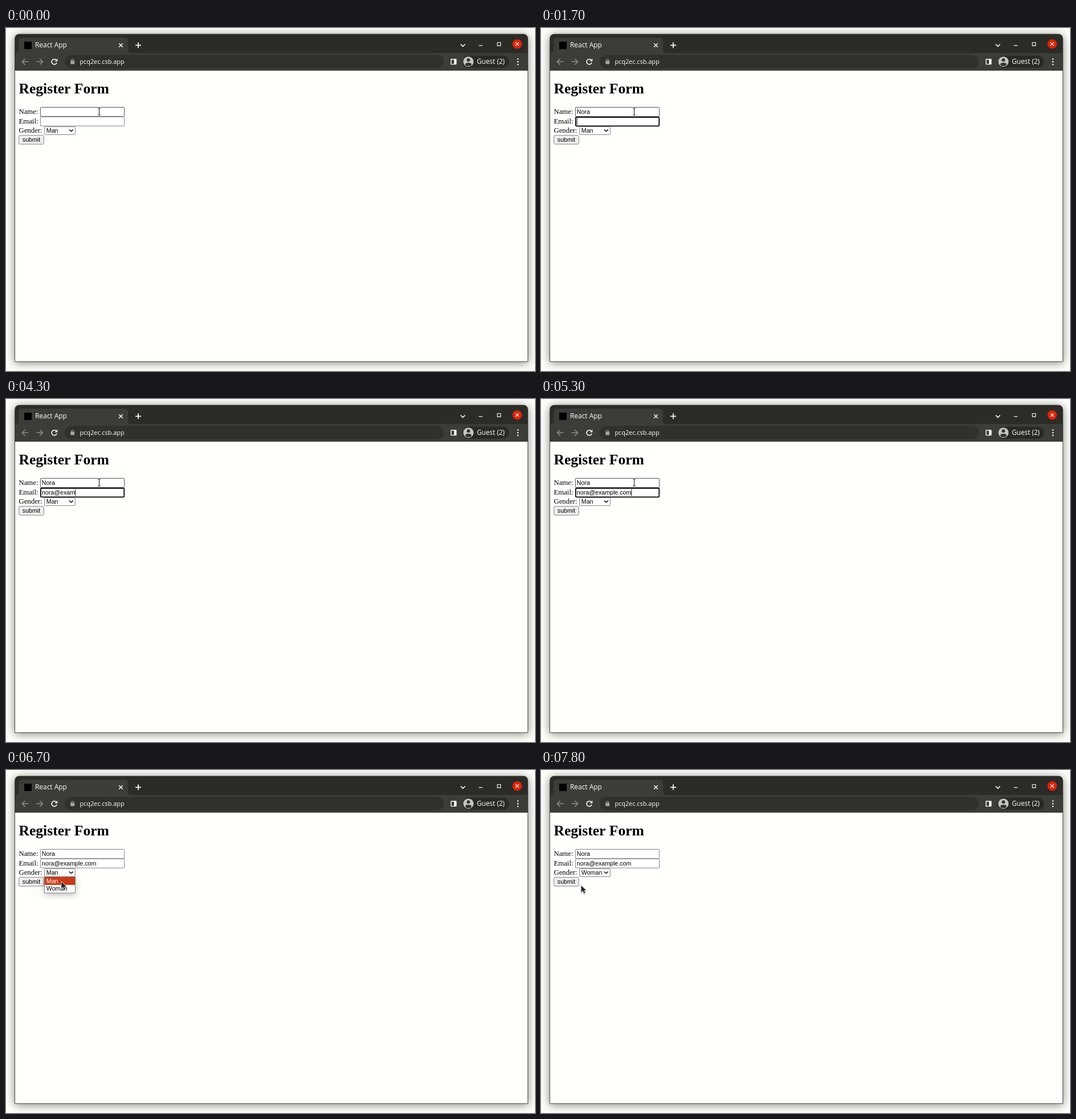
Write an HTML page with a canvas that moves like this. It is 928 px wide and 603 px high and loops after 8 s.

```html
<!DOCTYPE html>
<html lang="en">
<head>
<meta charset="utf-8">
<title>Register Form</title>
<style>
html, body { margin: 0; width: 100%; height: 100%; overflow: hidden; background: #fefefb; }
canvas { display: block; width: 928px; height: 603px; }
</style>
</head>
<body>
<canvas id="stage" width="928" height="603"></canvas>
<script>
const ctx = document.getElementById('stage').getContext('2d');
const LOOP = 8000, STEP = 100, ZOOM = 0.8;
const PAGE = '#fffffc', BAR = '#2b2c27', TOOL = '#3c3d38', GREY = '#767676';
const SERIF = '"Liberation Serif", "Times New Roman", serif';
const FIELD = '13.333px "Liberation Sans", Arial, sans-serif';
const UI = '"Open Sans", "Noto Sans", sans-serif';

// Each burst of typing starts at a time and runs at the field's pace.
const NAME = { y: 139.4, focus: 500, blur: 1700, pace: 40, bursts: [[1220, 'Nor'], [1500, 'a']] };
const EMAIL = {
  y: 156.2, focus: 1700, blur: 6400, pace: 120,
  bursts: [[2260, 'nora'], [3100, '@'], [3800, 'exa'], [4280, 'mp'], [4560, 'le.'], [5060, 'com']]
};
const MENU = { open: 6400, close: 7200 };
// Pointer moves: start, end, x, y
const MOVES = [[5700, 6300, 92.5, 186], [6500, 6900, 102, 207],
  [7100, 7400, 91, 213], [7500, 7800, 70.5, 203]];

const ease = p => p * p * (3 - 2 * p);

function pointerAt(t) {
  let x = 163.5, y = 147;
  for (const [from, to, tx, ty] of MOVES) {
    const p = ease(Math.min(1, Math.max(0, (t - from) / (to - from))));
    x += (tx - x) * p;
    y += (ty - y) * p;
  }
  return { x, y };
}

function typed(f, t) {
  let text = '', last = f.focus;
  for (const [start, part] of f.bursts) {
    [...part].forEach((letter, i) => {
      const at = start + i * f.pace;
      if (at > t) return;
      text += letter;
      last = Math.ceil(at / STEP) * STEP;
    });
  }
  return { text, caret: (t - last) % 1200 < 600 };
}

function box(x, y, w, h, fill, r = 0, stroke, lw = 1) {
  ctx.beginPath();
  ctx.roundRect(x, y, w, h, r);
  if (fill) { ctx.fillStyle = fill; ctx.fill(); }
  if (stroke) { ctx.strokeStyle = stroke; ctx.lineWidth = lw; ctx.stroke(); }
}

function disc(x, y, r, fill) {
  ctx.beginPath();
  ctx.arc(x, y, r, 0, Math.PI * 2);
  ctx.fillStyle = fill;
  ctx.fill();
}

function line(color, lw, ...runs) {
  ctx.beginPath();
  for (const p of runs) {
    ctx.moveTo(p[0], p[1]);
    for (let i = 2; i < p.length; i += 2) ctx.lineTo(p[i], p[i + 1]);
  }
  ctx.strokeStyle = color;
  ctx.lineWidth = lw;
  ctx.stroke();
}

function cross(x, y, r, color, lw) {
  line(color, lw, [x - r, y - r, x + r, y + r], [x + r, y - r, x - r, y + r]);
}

// Text is set at its full size and zoomed with the page; returns its drawn width.
function text(s, x, y, font, color = '#000') {
  ctx.save();
  ctx.translate(x, y);
  ctx.scale(ZOOM, ZOOM);
  ctx.font = font;
  ctx.fillStyle = color;
  ctx.fillText(s, 0, 0);
  const w = ctx.measureText(s).width * ZOOM;
  ctx.restore();
  return w;
}

function shadow(blur, alpha, dy, draw) {
  ctx.save();
  ctx.shadowColor = `rgba(0,0,0,${alpha})`;
  ctx.shadowBlur = blur;
  ctx.shadowOffsetY = dy;
  draw();
  ctx.restore();
}

function tabStrip() {
  ctx.beginPath();
  ctx.moveTo(16, 44);
  ctx.quadraticCurveTo(22, 44, 22, 38);
  ctx.lineTo(22, 23);
  ctx.quadraticCurveTo(22, 17, 28, 17);
  ctx.lineTo(208, 17);
  ctx.quadraticCurveTo(214, 17, 214, 23);
  ctx.lineTo(214, 38);
  ctx.quadraticCurveTo(214, 44, 220, 44);
  ctx.fillStyle = TOOL;
  ctx.fill();
  box(32, 24, 13, 13, '#000');
  text('React App', 51, 34.4, '14.9px ' + UI, '#fff');
  cross(201.5, 30.3, 3.3, '#f0f0ed', 1.5);
  line('#fff', 1.7, [227, 30.3, 237, 30.3], [232, 25.3, 232, 35.3]);
  line('#fff', 1.6, [797.6, 28.5, 801.5, 32.3, 805.4, 28.5]);
  line('#fff', 1.2, [829.5, 30.8, 836, 30.8]);
  box(862, 25.5, 5.6, 5.6, null, 0, '#fff', 1.1);
  disc(896.8, 28.2, 8.3, '#df2308');
  cross(896.8, 28.2, 3, '#fff', 1.2);
}

function toolbar() {
  box(15.2, 44, 900.6, 31, TOOL);
  const dim = '#8c8d88', lock = '#a4a5a0';
  line(dim, 1.5, [39.3, 59.3, 28.6, 59.3], [33.6, 54, 28.3, 59.3, 33.6, 64.6]);
  line(dim, 1.5, [53.5, 59.3, 64.2, 59.3], [59.2, 54, 64.5, 59.3, 59.2, 64.6]);

  ctx.beginPath();
  ctx.arc(84.7, 59.3, 4.6, 0.35, Math.PI * 1.75);
  ctx.strokeStyle = '#fff';
  ctx.lineWidth = 1.6;
  ctx.stroke();
  ctx.fillStyle = '#fff';
  ctx.fill(new Path2D('M90.3 53.7V58.6H85.4Z'));

  box(103, 47.3, 665, 24, '#30312c', 12);
  box(113.2, 57.6, 7, 6, lock, 0.8);
  ctx.strokeStyle = lock;
  ctx.lineWidth = 1.1;
  ctx.stroke(new Path2D('M114.7 58V57A2 2 0 0 1 118.7 57V58'));
  text('pcq2ec.csb.app', 129.4, 63, '13.6px ' + UI, '#fff');

  box(780.7, 55, 9, 8.6, null, 0.5, '#fff', 1.4);
  box(786, 55, 4, 8.6, '#fff');

  box(801, 48.5, 81.5, 21.5, '#292a25', 10.7);
  disc(811.2, 59.2, 9, '#c3c5c1');
  disc(811.2, 56.2, 2.9, '#34352f');
  ctx.beginPath();
  ctx.ellipse(811.2, 64, 5.5, 3.1, 0, 0, Math.PI * 2);
  ctx.fill();
  text('Guest (2)', 826, 63.3, '14.7px ' + UI, '#fff');
  for (const y of [54.6, 59.3, 64]) disc(898, y, 1.25, '#fff');
}

function browser() {
  ctx.fillStyle = '#fefefb';
  ctx.fillRect(0, 0, 928, 603);
  shadow(16, 0.5, 2, () => box(15.2, 10.5, 900.6, 576.3, BAR, [8, 8, 0, 0]));
  tabStrip();
  toolbar();
  box(16, 75, 899, 511, PAGE);
}

function field(f, t, hover) {
  const focused = t >= f.focus && t < f.blur;
  box(60.4, f.y, 147.2, 16, '#fff', 1.2, hover ? '#3c3c3c' : GREY, 0.9);
  if (focused) box(60.9, f.y + 0.6, 146.3, 15.5, '#fff', 1.8, '#000', 1.7);
  const { text: shown, caret } = typed(f, t);
  const w = text(shown, 62.8, f.y + 11.7, FIELD);
  if (focused && caret) box(62.8 + w, f.y + 2.2, 0.9, 12, '#000');
}

function squiggle() {
  ctx.beginPath();
  for (let x = 63; x <= 84; x += 0.5) ctx.lineTo(x, 169.3 + 0.7 * Math.sin(x * 1.9));
  ctx.strokeStyle = '#d93a3a';
  ctx.lineWidth = 0.9;
  ctx.stroke();
}

function popup(active) {
  shadow(12, 0.28, 3, () => box(67.4, 187.6, 54, 28.6, '#fff'));
  ['Man', 'Woman'].forEach((label, i) => {
    const on = i === active;
    if (on) box(67.5, 188 + i * 14, 54, 14, '#cb3a16');
    text(label, 70.8, 198.8 + i * 13.6, FIELD, on ? '#fff' : '#000');
  });
  box(67.4, 187.6, 54, 28.6, null, 0, '#77756f', 0.9);
}

function form(t, mouse) {
  text('Register Form', 22.4, 115.2, 'bold 32px ' + SERIF);
  ['Name:', 'Email:', 'Gender:'].forEach((label, i) => {
    text(label, 22.4, 151 + i * 16.7, '16px ' + SERIF);
  });

  field(NAME, t, mouse.y < 156);
  field(EMAIL, t, false);
  if (t >= 6000 && t < EMAIL.blur) squiggle();

  const hover = mouse.y > 173 && mouse.y < 188 && mouse.x < 121;
  box(67.5, 173.6, 53.8, 13.9, '#fff', 1.2, hover ? '#4c4c4c' : GREY, 0.9);
  text(t < MENU.close ? 'Man' : 'Woman', 70.8, 184, FIELD);
  line('#111', 1.5, [111, 178.6, 114.3, 181.8, 117.6, 178.6]);

  box(22.7, 188.7, 43.6, 15.5, '#efefed', 1.8, GREY, 0.9);
  text('submit', 28.8, 200.2, FIELD);

  if (t >= MENU.open && t < MENU.close) popup(mouse.y < 202 ? 0 : 1);
}

function pointer({ x, y }) {
  ctx.save();
  ctx.translate(x, y);
  if (y < 173) {
    const beam = [[-2.3, -6, 2.3, -6], [0, -6, 0, 6], [-2.3, 6, 2.3, 6]];
    line('#fff', 2.4, ...beam);
    line('#222', 1.1, ...beam);
  } else {
    const arrow = new Path2D('M0 0V12L2.9 9.3L5 14L7 13.1L4.9 8.6H8.7Z');
    ctx.strokeStyle = '#fff';
    ctx.lineWidth = 1.6;
    ctx.lineJoin = 'round';
    shadow(2, 0.35, 1, () => ctx.stroke(arrow));
    ctx.fillStyle = '#262626';
    ctx.fill(arrow);
  }
  ctx.restore();
}

function frame(now) {
  const t = Math.floor((now % LOOP) / STEP) * STEP;
  const mouse = pointerAt(t);
  browser();
  form(t, mouse);
  pointer(mouse);
}

const start = performance.now();
function tick() {
  frame(performance.now() - start);
  requestAnimationFrame(tick);
}
tick();
</script>
</body>
</html>
```
